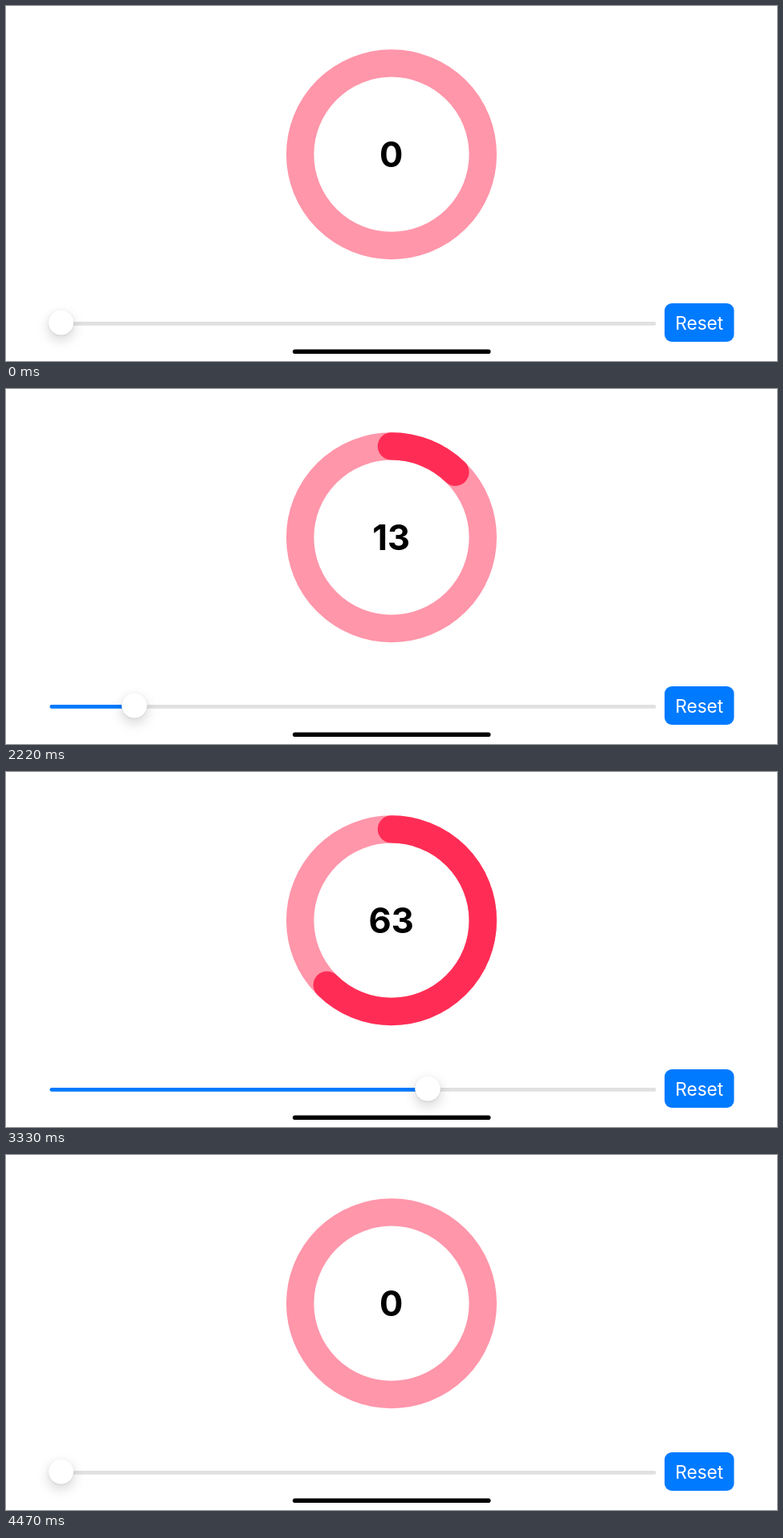
Recreate the animation shown at these times as an HTML page with a canvas. Size 960 px wide and 443 px high, loop 4.5 s.

```html
<!DOCTYPE html>
<html lang="en">
<head>
<meta charset="utf-8">
<title>Progress ring</title>
<style>
html, body { margin: 0; width: 100%; height: 100%; overflow: hidden; background: #fff; }
canvas { display: block; width: 960px; height: 443px; }
</style>
</head>
<body>
<canvas id="stage" width="960" height="443"></canvas>
<script>
const ctx = document.getElementById('stage').getContext('2d');
const LOOP = 4500, STEP = 30, LAG = 85;
const RESET = 4100, RETURN = 360;
const PINK = '#ff2d55', BLUE = '#007aff';

// Drag of the slider: time in ms, value in percent
const drag = [
  [1500, 0], [1530, 0.2], [1620, 2.4], [1700, 6.2], [1775, 9.8], [1860, 11.2],
  [2050, 12], [2300, 13], [2430, 15.6], [2500, 18.9], [2580, 23.7],
  [2700, 32.5], [2850, 44.5], [3000, 54.5], [3150, 60.6], [3250, 62.5],
  [3330, 62.9], [3430, 65.5], [3550, 76], [3660, 87.5], [3760, 95],
  [3850, 99], [3910, 100]
];

const clamp = (x, a, b) => Math.min(b, Math.max(a, x));
const smooth = x => { x = clamp(x, 0, 1); return x * x * (3 - 2 * x); };

// Monotone tangent: harmonic mean of neighbouring slopes
function slopeAt(i) {
  if (i === 0 || i === drag.length - 1) return 0;
  const s = j => (drag[j + 1][1] - drag[j][1]) / (drag[j + 1][0] - drag[j][0]);
  const a = s(i - 1), b = s(i);
  return a * b > 0 ? 2 * a * b / (a + b) : 0;
}

function dragValue(t) {
  const last = drag.length - 1;
  if (t <= drag[0][0]) return 0;
  if (t >= drag[last][0]) return 100;
  let i = 0;
  while (drag[i + 1][0] < t) i++;
  const [t0, v0] = drag[i], [t1, v1] = drag[i + 1];
  const h = t1 - t0, u = (t - t0) / h, w = 1 - u;
  return v0 * (1 + 2 * u) * w * w + slopeAt(i) * h * u * w * w
       + v1 * u * u * (3 - 2 * u) - slopeAt(i + 1) * h * u * u * w;
}

const sliderValue = t => t < RESET ? dragValue(t) : 0;
const ringValue = t => t < RESET
  ? dragValue(t - LAG)
  : 100 * (1 - smooth((t - RESET) / RETURN));
const pressed = t => smooth((t - 4010) / 80) * (1 - smooth((t - 4110) / 360));

function pill(x, y, w, h, r, color) {
  ctx.fillStyle = color;
  ctx.beginPath();
  ctx.roundRect(x, y, w, h, r);
  ctx.fill();
}

function label(text, x, y, font, color) {
  ctx.font = font + ' Inter, Roboto, sans-serif';
  ctx.textAlign = 'center';
  ctx.textBaseline = 'alphabetic';
  ctx.fillStyle = color;
  ctx.fillText(text, x, y);
}

function ring(part, color) {
  ctx.strokeStyle = color;
  ctx.lineWidth = 34.4;
  ctx.lineCap = 'round';
  ctx.beginPath();
  ctx.arc(480, 185.2, 113.8, -Math.PI / 2, -Math.PI / 2 + part * 2 * Math.PI);
  ctx.stroke();
}

function disc(x, y, r, color, shadow, blur, dy) {
  ctx.save();
  ctx.shadowColor = shadow;
  ctx.shadowBlur = blur;
  ctx.shadowOffsetY = dy;
  ctx.fillStyle = color;
  ctx.beginPath();
  ctx.arc(x, y, r, 0, 2 * Math.PI);
  ctx.fill();
  ctx.restore();
}

function slider(value) {
  const x = 68.5 + 7.26 * value;
  pill(54.5, 394, 755, 4.8, 2.4, '#e1e1e2');
  if (value > 0) pill(54.5, 394, x - 54.5, 4.8, 2.4, BLUE);
  disc(x, 395, 15.8, '#fff', 'rgba(0,0,0,0.17)', 15, 6);
  disc(x, 395, 15.6, '#fff', 'rgba(0,0,0,0.16)', 2, 0.5);
}

function button(p) {
  pill(820, 371, 86.5, 48, 9, '#fff');
  pill(820, 371, 86.5, 48, 9, `rgba(0,122,255,${1 - 0.24 * p})`);
  label('Reset', 863.2, 403.6, '400 22.7px', `rgba(255,255,255,${1 - 0.3 * p})`);
}

function draw(t) {
  ctx.fillStyle = '#fff';
  ctx.fillRect(0, 0, 960, 443);
  const value = sliderValue(t), part = ringValue(t) / 100;
  ring(1, '#ff96aa');
  if (part > 0) ring(part, PINK);
  label(String(Math.round(value)), 479.7, 201, '700 43.5px', '#000');
  slider(value);
  button(pressed(t));
  pill(357, 428.4, 246.5, 5.6, 2.8, '#000');
}

function frame(now) {
  draw(Math.floor(now % LOOP / STEP) * STEP);
  requestAnimationFrame(frame);
}
draw(0);
requestAnimationFrame(frame);
</script>
</body>
</html>
```
